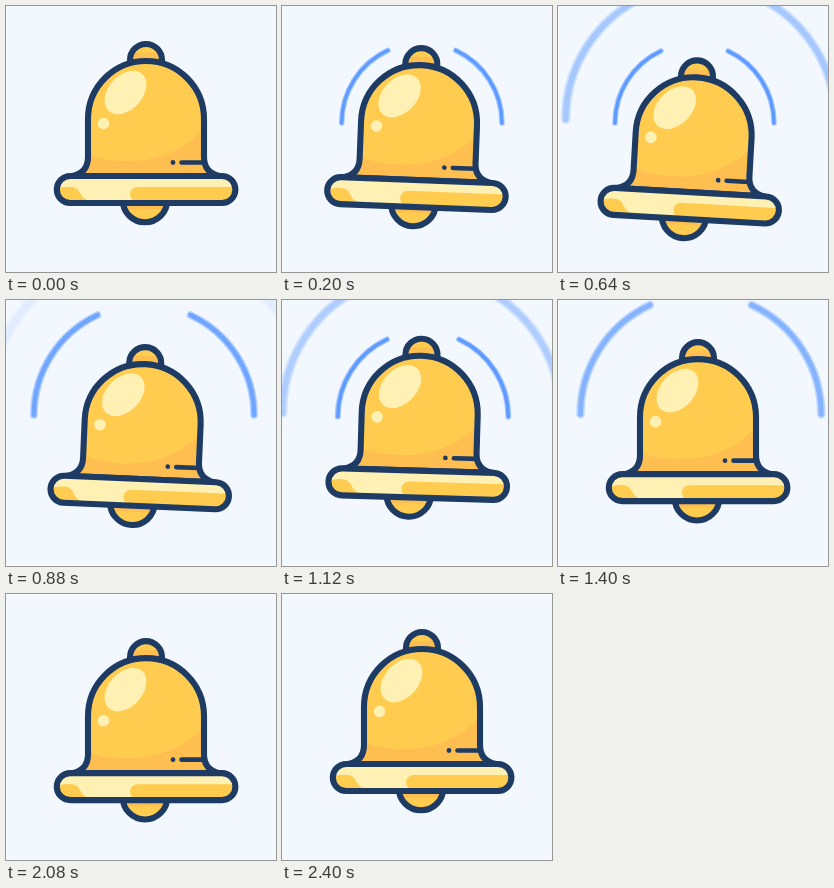
Recreate the animation shown at these times as an HTML page with a canvas. Size 270x266 px, loop 2.44 s.

```html
<!DOCTYPE html>
<html lang="en">
<head>
<meta charset="utf-8">
<title>Ringing bell</title>
<style>
  html, body { margin: 0; width: 100%; height: 100%; overflow: hidden; background: #f3f8ff; }
  canvas { display: block; width: 270px; height: 266px; }
</style>
</head>
<body>
<canvas id="stage" width="270" height="266"></canvas>
<script>
const ctx = document.getElementById('stage').getContext('2d');
const LOOP = 2440, STEP = 40, BOB = 1200;
const NAVY = '#1e3b64', GOLD = '#ffcc4f', SHADE = '#ffbf50', LIGHT = '#fff0b3';
const PIVOT = { x: 140, y: 36 };

// [time, value] keys
const TILT = [[0, 0], [400, 4.4], [640, 3.25], [1120, 1.7], [1360, 0], [LOOP, 0]];
const CLAPPER = [[0, 0], [400, -3], [640, -4], [1120, -7.5], [1360, 0], [LOOP, 0]];
const WAVES = [
  { start: 0, x: 139.8 },
  { start: 445, x: 136.5 },
  { start: 881, x: 140.8 }
];

const clamp = v => Math.max(0, Math.min(1, v));

function keyed(keys, t) {
  const i = keys.findIndex(k => k[0] > t);
  const [t0, a] = keys[i - 1], [t1, b] = keys[i];
  return a + (b - a) * (1 - Math.cos(Math.PI * (t - t0) / (t1 - t0))) / 2;
}

function fill(color, path) {
  ctx.fillStyle = color;
  ctx.fill(path);
}

function outline(path, width = 6.1) {
  ctx.strokeStyle = NAVY;
  ctx.lineWidth = width;
  ctx.stroke(path);
}

function disc(x, y, r) {
  const p = new Path2D();
  p.arc(x, y, r, 0, Math.PI * 2);
  return p;
}

function pill(x, y, w, h) {
  const p = new Path2D();
  p.roundRect(x, y, w, h, h / 2);
  return p;
}

function clipped(path, draw) {
  ctx.save();
  ctx.clip(path);
  draw();
  ctx.restore();
}

const dome = new Path2D('M66 170 Q82 167 82 151 V113 A58 58 0 0 1 198 113 V151 Q198 167 214 170 Z');
const domeShade = new Path2D('M78 147 C108 160 168 162 202 118 V172 H60 V164 Z');
const slit = new Path2D('M175.5 156.5 H198');
const brim = pill(50.8, 170, 178.6, 27);
const brimLeft = new Path2D('M52 183 Q58 180 66 181 C75 182 73 191 81 194 V198 H50 Z');
const shine = new Path2D();
shine.ellipse(119.5, 86.5, 25, 17, -0.84, 0, Math.PI * 2);

function drawWave(wave, t) {
  const life = t - wave.start;
  if (life < 0) return;
  const age = life - 195;
  const r = 79.5 + 0.131 * age - 0.000015 * age * age;
  const alpha = clamp((170 - r) / 68) * clamp(life / 80);
  if (alpha <= 0) return;
  const x = wave.x + (r - 80) * 0.05;
  const y = 117 - (r - 80) * 0.07;
  const open = 65 * Math.PI / 180;
  const arcs = new Path2D();
  arcs.arc(x, y, r, Math.PI, Math.PI + open);
  arcs.moveTo(x + r * Math.cos(open), y - r * Math.sin(open));
  arcs.arc(x, y, r, -open, 0);

  // a wide faint stroke under a narrow one gives the soft edge
  const soft = alpha / 2;
  ctx.strokeStyle = '#5f9bff';
  for (const [width, opacity] of [[0.07, soft], [0.042, soft / (1 - soft)]]) {
    ctx.globalAlpha = opacity;
    ctx.lineWidth = r * width;
    ctx.stroke(arcs);
  }
  ctx.globalAlpha = 1;
}

function drawBall(ball, shadeY, shadeHeight) {
  fill(GOLD, ball);
  clipped(ball, () => {
    ctx.fillStyle = SHADE;
    ctx.fillRect(80, shadeY, 120, shadeHeight);
  });
  outline(ball);
}

function drawBell(t) {
  const drop = 8.3 * (1 - Math.cos(2 * Math.PI * t / BOB));
  ctx.save();
  ctx.translate(PIVOT.x, PIVOT.y + drop);
  ctx.rotate(keyed(TILT, t) * Math.PI / 180);
  ctx.translate(-PIVOT.x, -PIVOT.y);

  drawBall(disc(140, 54, 16), 47, 10);
  drawBall(disc(139 + keyed(CLAPPER, t), 194, 22.3), 194, 9);

  fill(GOLD, dome);
  clipped(dome, () => fill(SHADE, domeShade));
  fill(LIGHT, shine);
  fill(LIGHT, disc(97.5, 117.5, 5.8));
  outline(dome);
  outline(slit, 4.6);
  fill(NAVY, disc(167, 156.5, 2.4));

  fill(LIGHT, brim);
  clipped(brim, () => {
    fill(GOLD, brimLeft);
    fill(GOLD, pill(124, 181, 112, 15));
  });
  outline(brim);
  ctx.restore();
}

function frame(now) {
  const t = Math.floor((now % LOOP) / STEP) * STEP;
  ctx.fillStyle = '#f3f8ff';
  ctx.fillRect(0, 0, 270, 266);
  ctx.lineCap = ctx.lineJoin = 'round';
  WAVES.forEach(wave => drawWave(wave, t));
  drawBell(t);
}

const origin = performance.now();
function tick() {
  frame(performance.now() - origin);
  requestAnimationFrame(tick);
}
tick();
</script>
</body>
</html>
```
